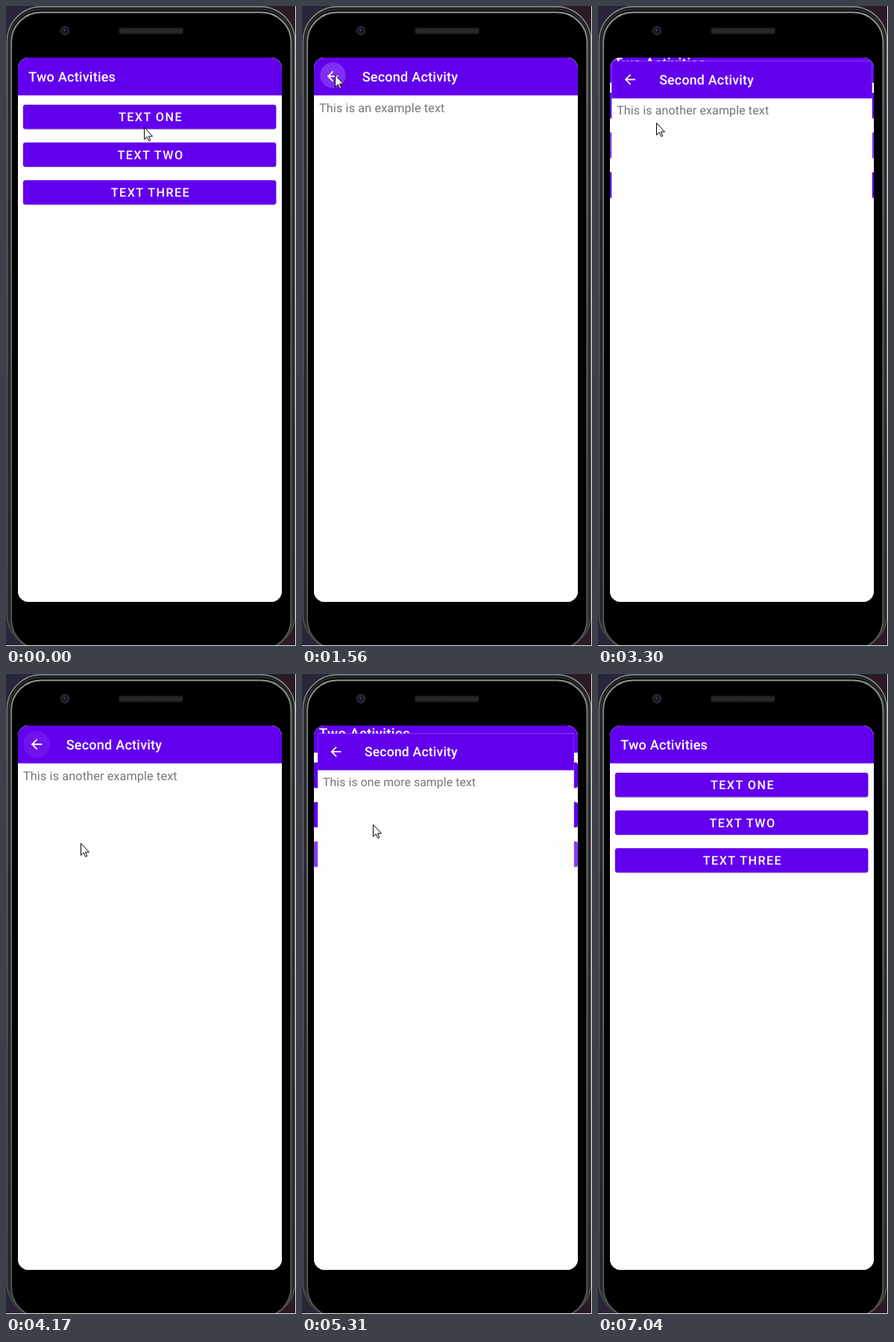
Recreate the animation shown at these times as an HTML page. Size 389 px wide and 856 px high, loop 8.22 s.

```html
<!DOCTYPE html>
<html lang="en">
<head>
<meta charset="utf-8">
<title>Two Activities</title>
<style>
  html, body { margin: 0; width: 100%; height: 100%; overflow: hidden; background: #211d29; }
  svg { display: block; width: 389px; height: 856px; }
  text { font-family: Roboto, sans-serif; fill: #fff; text-rendering: geometricPrecision; }
  .title { font-size: 18.03px; font-weight: 500; letter-spacing: .0125em; }
  .label { font-size: 16.22px; font-weight: 500; letter-spacing: .0893em; text-anchor: middle; }
  .body { font-size: 16.22px; letter-spacing: .13px; fill: #757575; }
  .page { transform-origin: 193px 433px; }
</style>
</head>
<body>
<svg viewBox="0 0 389 856">
  <defs>
    <clipPath id="screen"><rect x="16" y="69" width="354" height="728" rx="14.5"/></clipPath>
    <clipPath id="keyClip"><rect id="keyBox" x="23" width="339.3" height="32.4" rx="3.2"/></clipPath>
    <linearGradient id="desk"><stop stop-color="#29263a"/><stop offset="1" stop-color="#2b1a26"/></linearGradient>
    <linearGradient id="rim" x2="0" y2="1">
      <stop stop-color="#8f9593"/><stop offset=".06" stop-color="#747977"/>
      <stop offset=".5" stop-color="#606463"/><stop offset="1" stop-color="#505453"/>
    </linearGradient>
    <linearGradient id="mesh" x2="0" y2="1">
      <stop stop-color="#1b1b1b"/><stop offset=".5" stop-color="#2b2b2b"/><stop offset="1" stop-color="#1d1d1d"/>
    </linearGradient>
  </defs>

  <g id="phone" stroke="url(#rim)">
    <rect width="389" height="856" fill="url(#desk)" stroke="none"/>
    <rect x="1.5" y="1" width="386" height="859" rx="46" fill="#171918" stroke-width="1.6"/>
    <rect x="4.2" y="4.5" width="380.5" height="856" rx="43" fill="#090a0a" stroke="#2b2e2d" stroke-width="2"/>
    <rect x="7" y="8.5" width="375.5" height="852" rx="40" fill="#000" stroke-width="2.2"/>
    <rect x="151.5" y="29" width="86" height="8.5" rx="3" fill="url(#mesh)" stroke="none"/>
    <circle cx="79" cy="33" r="6.5" fill="#25242b" stroke="none"/>
    <circle cx="79" cy="33" r="3.6" fill="#131322" stroke="none"/>
    <circle cx="78.5" cy="32.5" r="1.4" fill="#3b3b6c" stroke="none"/>
    <path d="M388.5 0V855.5H0" fill="none" stroke="#e4e4e4"/>
  </g>

  <g clip-path="url(#screen)">
    <rect x="16" y="69" width="354" height="728" fill="#fff"/>
    <g id="home" class="page">
      <rect x="16" y="69" width="354" height="728" fill="#fefefe"/>
      <rect x="16" y="69" width="354" height="50.5" fill="#6200ee"/>
      <text class="title" x="30.2" y="100.7">Two Activities</text>
      <g id="keys"></g>
      <circle id="keyRipple" fill="#fff" fill-opacity=".24" clip-path="url(#keyClip)"/>
    </g>
    <g id="second" class="page">
      <rect x="16" y="69" width="354" height="728" fill="#fefefe"/>
      <rect x="16" y="69" width="354" height="50.5" fill="#6200ee"/>
      <circle id="backRipple" fill="#fff"/>
      <path fill="#fff" transform="translate(30.2 83.2) scale(.9)"
        d="M20 11H7.83l5.59-5.59L12 4l-8 8 8 8 1.41-1.41L7.83 13H20z"/>
      <text class="title" x="80.7" y="100.7">Second Activity</text>
      <text class="body" id="message" x="23" y="141.5"></text>
    </g>
  </g>

  <path id="cursor" fill="#fff" stroke="#000" stroke-linejoin="round"
    d="M.5 .5V16.5L4.2 13L6.7 18.5L8.8 17.6L6.5 12.2H11.5Z"/>
</svg>
<script>
const $ = id => document.getElementById(id);
const LOOP = 8220;
const clamp = v => Math.max(0, Math.min(1, v));
const set = (el, attrs) => { for (const k in attrs) el.setAttribute(k, attrs[k]); };
const keyY = i => 132 + 50.5 * i;

$("keys").innerHTML = ["ONE", "TWO", "THREE"].map((word, i) => `
  <rect x="22.5" y="${keyY(i) + .6}" width="340.3" height="32.8" rx="3.6" fill="#000" opacity=".22"/>
  <rect x="23" y="${keyY(i)}" width="339.3" height="32.4" rx="3.2" fill="#6200ee"/>
  <text class="label" x="194" y="${keyY(i) + 22.1}">TEXT ${word}</text>`).join("");

const visits = [
  { press: 110, open: 330, back: 1500, close: 1770, text: "This is an example text" },
  { press: 2800, open: 3000, back: 3700, close: 4220, text: "This is another example text" },
  { press: 4900, open: 5100, back: 6130, close: 6440, text: "This is one more sample text" }
];

// Bursts of screen updates: first time, last time, number of updates
const bursts = [
  [120, 1020, 7], [1170, 1290, 2], [1560, 2490, 8], [2610, 3570, 8],
  [3720, 4680, 8], [4800, 5710, 7], [5860, 5860, 1], [6140, 7040, 8]
];

// Pointer tip: time, x, y
const path = [
  [0, 185, 162], [330, 185, 162], [1020, 49, 93], [1170, 46, 89], [1290, 44, 92],
  [1830, 44, 92], [2490, 88, 180], [2610, 90, 182], [2800, 100, 197], [3000, 100, 197],
  [3570, 40, 86], [3900, 40, 86], [4170, 100, 226], [4680, 115, 246], [4800, 116, 248],
  [5060, 118, 250], [5710, 39, 84], [5860, 42, 84], [6410, 42, 84], [6925, 367, 793]
];

// Time of the latest update; each burst takes its 150 ms steps first, then 120 ms ones
function held(t) {
  let last = 0;
  for (const [from, to, n] of bursts) {
    for (let k = 0; k < n; k++) {
      const at = Math.min(from + 150 * k, to - 120 * (n - 1 - k));
      if (at <= t) last = at;
    }
  }
  return last;
}

function pointer(t) {
  const i = path.findIndex(p => p[0] > t);
  if (i < 0) return path[path.length - 1].slice(1);
  const [t0, x0, y0] = path[i - 1], [t1, x1, y1] = path[i];
  const k = (t - t0) / (t1 - t0);
  return [Math.round(x0 + (x1 - x0) * k), Math.round(y0 + (y1 - y0) * k)];
}

const ease = k => 1 - (1 - clamp(k)) ** 3;

function draw(t) {
  const index = visits.findLastIndex(v => t >= v.press);
  const visit = visits[Math.max(0, index)];
  const shown = ease((t - visit.open) / 400) - ease((t - visit.close) / 400);

  $("home").style.transform = `scale(${1 + .06 * shown})`;
  $("second").style.transform = `scale(${.88 + .12 * shown})`;
  $("second").style.opacity = clamp(shown * 1.5);
  $("message").textContent = visit.text;

  const pressed = index >= 0 && t < visit.open + 400;
  const [px, py] = pointer(visit.press);
  set($("keyBox"), { y: keyY(Math.max(0, index)) });
  set($("keyRipple"), { cx: px, cy: py, r: pressed ? 40 + 260 * clamp((t - visit.press) / 225) : 0 });

  const age = t - visit.back;
  const grow = clamp((age - 50) / 100);
  set($("backRipple"), {
    cx: 41.5 - .5 * grow, cy: 92.5 + 1.5 * grow, r: 17 + grow,
    "fill-opacity": age < 0 ? 0 : .2 * clamp(1 - age / 750)
  });

  const [x, y] = pointer(t);
  set($("cursor"), { transform: `translate(${x} ${y})`, visibility: t < 7030 ? "visible" : "hidden" });
}

const start = performance.now();
function tick() {
  draw(held((performance.now() - start) % LOOP));
  requestAnimationFrame(tick);
}
tick();
</script>
</body>
</html>
```
